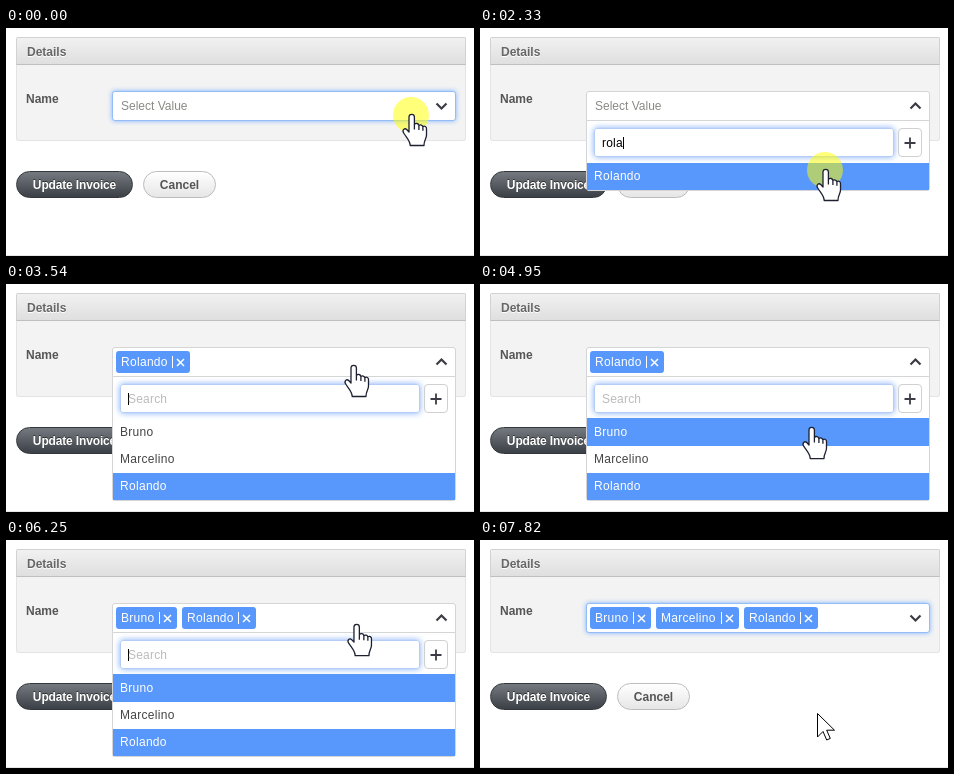
Animation, 468 px wide and 228 px high, one loop 8070 ms. Source, as an HTML page:

```html
<!DOCTYPE html>
<html lang="en">
<head>
<meta charset="utf-8">
<title>Multi-select field</title>
<style>
* { box-sizing: border-box; }
html, body { margin: 0; width: 100%; height: 100%; overflow: hidden; background: #fff; }
body { position: relative; font: 12px "Liberation Sans", Arial, sans-serif; color: #444; white-space: nowrap; }
body > *, #menu > div, #field > * { position: absolute; }
[hidden] { display: none !important; }
#head { left: 10px; top: 9px; width: 450px; height: 28px; padding-left: 10px; line-height: 28px; font-weight: bold; color: #666; text-shadow: 0 1px #fff;
  border: 1px solid #d2d2d2; border-bottom-color: #bfbfbf; border-radius: 2px 2px 0 0; background: linear-gradient(#f1f1f1, #dfdfdf); }
#panel { left: 10px; top: 37px; width: 450px; height: 76px; border: 1px solid #e4e4e4; border-top: 0; border-radius: 0 0 3px 3px; background: #f3f3f3; }
#label { left: 20px; top: 64px; font-weight: bold; color: #555; }
.button { top: 143px; height: 27px; line-height: 27px; border-radius: 14px; font-weight: bold; text-align: center; }
#update { left: 10px; width: 117px; color: #fff; letter-spacing: -.15px; text-shadow: 0 -1px #333; border: 1px solid #33383c; background: linear-gradient(#747a80, #3b4046); }
#cancel { left: 137px; width: 73px; color: #555; border: 1px solid #bcbcbc; background: linear-gradient(#fff, #e6e6e6); }
#rule { left: 0; top: 227px; width: 100%; height: 1px; background: #e8e8e8; }
#field { left: 106px; top: 63px; width: 344px; height: 30px; background: #fff; border: 1px solid #92bdf8; border-radius: 3px; box-shadow: 0 0 5px #7fb2fa; }
#field.open { border-color: #d5d5d5; border-radius: 3px 3px 0 0; box-shadow: none; }
#hint { left: 8px; top: 7px; color: #8a8a84; }
#chips { left: 3px; top: 3px; display: flex; gap: 5px; }
.chip { position: relative; height: 22px; padding-left: 5px; line-height: 23px; letter-spacing: .3px; color: #fff; background: #5897fb; border-radius: 3px; }
.chip svg { position: absolute; right: 1px; top: 0; }
svg { overflow: visible; fill: none; }
#menu { left: 106px; top: 92px; width: 344px; padding-top: 42px; background: #fff; border: 1px solid #d5d5d5; border-radius: 0 0 3px 3px; }
#menu #search { left: 7px; top: 7px; width: 300px; height: 29px; padding-left: 7px; line-height: 28px; color: #000; letter-spacing: .2px;
  border: 1px solid #b4cdf5; border-radius: 3px; box-shadow: 0 0 6px #7fabf5; }
#caret { display: inline-block; width: 1px; height: 12px; margin-right: -1px; vertical-align: -2px; background: #000; }
#placeholder { color: #bbb; }
#menu #add { left: 311px; top: 7px; width: 24px; height: 29px; border: 1px solid #d0d0d0; border-radius: 4px; }
#menu .row { position: static; height: 27px; line-height: 27px; padding-left: 7px; letter-spacing: .3px; }
#menu .row.on { color: #fff; background: #5897fb; }
#menu #add + .row { height: 28px; margin-top: -1px; padding-top: 1px; }
#pointer { left: 0; top: 0; }
</style>
</head>
<body>
<div id="head">Details</div>
<div id="panel"></div>
<div id="label">Name</div>
<div id="update" class="button">Update Invoice</div>
<div id="cancel" class="button">Cancel</div>
<div id="rule"></div>
<div id="field"><span id="hint">Select Value</span><div id="chips"></div></div>
<div id="menu">
  <div id="search"><span id="typed"></span><span id="caret"></span><span id="placeholder">Search</span></div>
  <div id="add"><svg width="22" height="27" stroke="#3c3c46" stroke-width="1.8"><path d="M5.5 14H16.5M11 8.500V19.500"/></svg></div>
</div>
<svg id="pointer" width="468" height="228">
  <path id="chevron" stroke="#3c3c46" stroke-width="2.2"/>
  <g id="mouse" fill="#fff" stroke-linejoin="round">
    <circle id="press" r="18" cy="1" fill="#ff0" fill-opacity=".52"/>
    <path id="hand" stroke="#1c2030" stroke-width="1.3" transform="translate(.7)" d="M-2.7 18V3a2.7 2.7 0 0 1 5.4 0V10.5a2.5 2.5 0 0 1 4.5 1 2.5 2.5 0 0 1 4 1.2a2.2 2.2 0 0 1 3.6 2V21c0 4-2.5 5-2.5 10.5H-1.5C-1.5 27-4 25-8 19c-2-3 1-5.5 3-3.5zM2.7 10.5v5M7.2 11.5v4.500M11.2 12.700v4"/>
    <path id="arrow" stroke="#000" d="M.5 .5V24l5.500-5.500 3.700 8.500 3.600-1.600-3.600-8.200H17.500z"/>
  </g>
</svg>
<script>
const LOOP = 8070;
const $ = id => document.getElementById(id);
const within = (t, spans) => spans.find(([from, to]) => t >= from && t < to);

const people = [['Bruno', 61], ['Marcelino', 83], ['Rolando', 74]];
const chosenFrom = [5520, 7740, 2650];
const openSpans = [[80, 2570], [3380, 5440], [6170, 7660]];
const pressSpans = [[0, 80], [2250, 2410], [3220, 3380], [5200, 5360], [5920, 6170], [7340, 7500]];
const query = 'rola', typeStart = 1170, typeStep = 80, filterSpan = [[1330, 2490]];

// Pointer path: time, x, y
const path = [
  [0, 405, 86], [1830, 405, 86], [2150, 345, 141], [2570, 345, 141], [2810, 345, 76], [2890, 347, 81],
  [3710, 347, 81], [4030, 347, 97], [4710, 347, 97], [4950, 331, 143], [5030, 331, 147], [5520, 331, 147],
  [5680, 352, 103], [5840, 350, 84], [6250, 350, 84], [6750, 331, 168], [6840, 331, 168], [7000, 331, 173],
  [7660, 331, 173], [7820, 337, 173], [LOOP, 337, 173]
];

function add(parent, className, html) {
  const el = document.createElement('div');
  el.className = className;
  el.innerHTML = html;
  return parent.appendChild(el);
}

const cross = '<svg width="20" height="22" stroke="#fff" stroke-width="1.5"><path stroke-width="1" d="M3.5 5V17"/><path d="M8 8l7 7m0-7l-7 7"/></svg>';
const chips = people.map(([name, width]) => {
  const chip = add($('chips'), 'chip', name + cross);
  chip.style.width = width + 'px';
  return chip;
});
const rows = people.map(([name]) => add($('menu'), 'row', name));

function pointerAt(t) {
  const i = path.findIndex(key => key[0] > t);
  const [t0, x0, y0] = path[i - 1], [t1, x1, y1] = path[i];
  const k = (t - t0) / (t1 - t0);
  return [x0 + (x1 - x0) * k, y0 + (y1 - y0) * k];
}

function caretVisible(t, openedAt) {
  if (t >= 1090 && t < 2490) return t < 1660 || t >= 2160;
  return Math.floor((t - openedAt) / 500) % 2 === 0;
}

function draw(t) {
  const open = within(t, openSpans);
  const filtered = within(t, filterSpan);
  const [x, y] = pointerAt(t);
  const chosen = chosenFrom.map(start => t >= start);

  $('field').classList.toggle('open', !!open);
  $('hint').hidden = chosen.includes(true);
  chips.forEach((chip, i) => chip.hidden = !chosen[i]);
  const flipped = open || (t >= 2570 && t < 2650);
  $('chevron').setAttribute('d', flipped ? 'M430.5 80.500l5-5 5 5' : 'M430.5 75.500l5 5 5-5');

  $('menu').hidden = !open;
  if (open) {
    const count = t < 2490 ? Math.max(0, Math.floor((t - typeStart) / typeStep) + 1) : 0;
    $('typed').textContent = query.slice(0, count);
    $('placeholder').hidden = count > 0;
    $('caret').style.opacity = +caretVisible(t, open[0]);
    rows.forEach((row, i) => row.hidden = filtered && i < 2);
    const hovered = rows.filter(row => !row.hidden)[Math.floor((y - 135) / 27)];
    rows.forEach((row, i) => row.classList.toggle('on', chosen[i] || row === hovered));
  }

  const hand = open || y < 94;
  $('mouse').setAttribute('transform', `translate(${x} ${y})`);
  $('hand').style.display = hand ? '' : 'none';
  $('arrow').style.display = hand ? 'none' : '';
  $('press').style.display = within(t, pressSpans) ? '' : 'none';
}

const start = performance.now();
function tick() {
  draw((performance.now() - start) % LOOP);
  requestAnimationFrame(tick);
}
tick();
</script>
</body>
</html>
```
